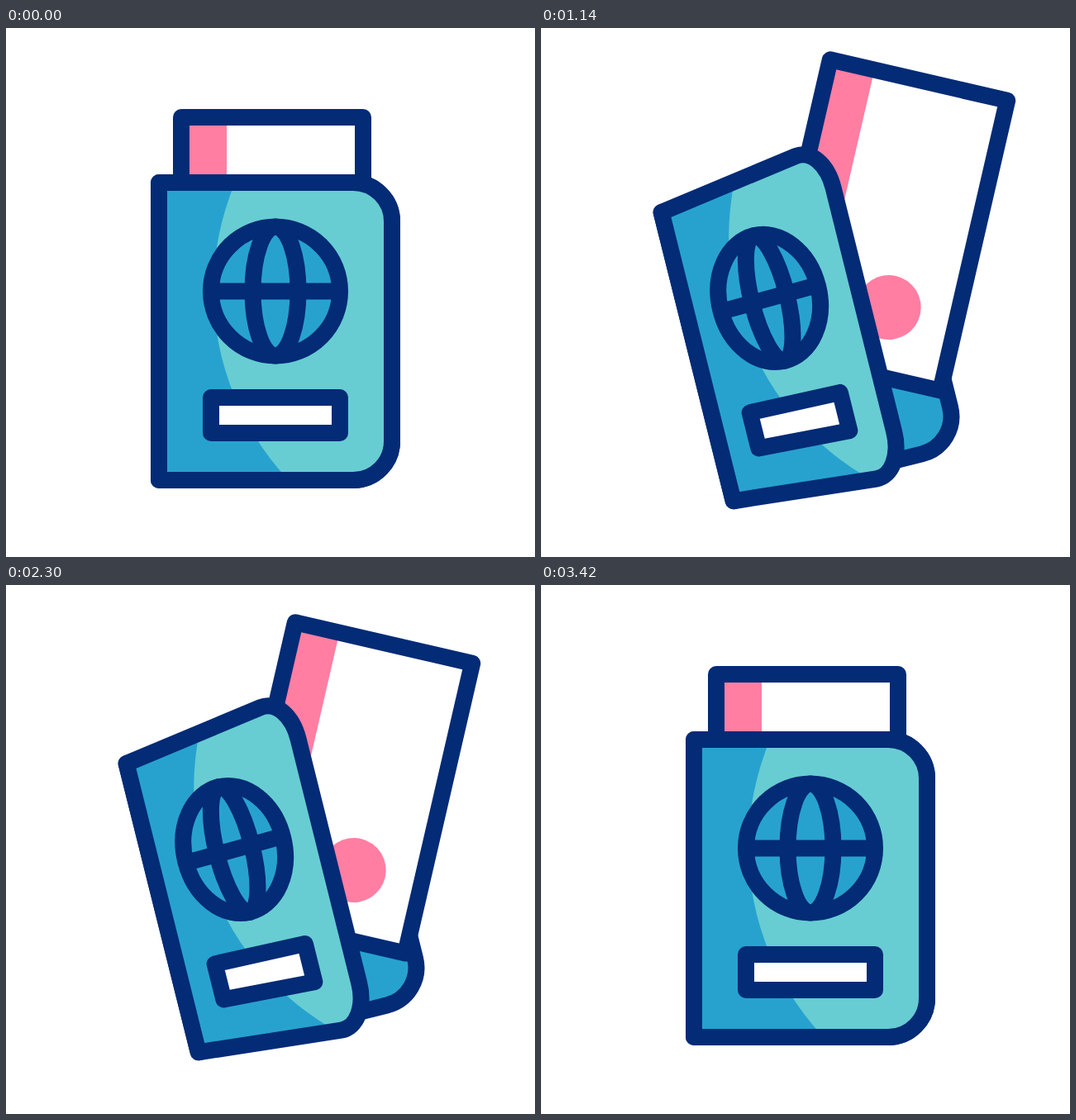
An HTML page that plays this animation: 640 by 640 pixels, repeating every 3.62 s.

```html
<!DOCTYPE html>
<html lang="en">
<head>
<meta charset="utf-8">
<title>Passport and ticket</title>
<style>
  html, body { margin: 0; width: 100%; height: 100%; overflow: hidden; background: #fff; }
  svg { display: block; width: 100vw; height: 100vh; }
  .line { stroke: #032b76; stroke-width: 20; stroke-linejoin: round; fill: none; }
  .blue { fill: #27a2cf; }
  .teal { fill: #67cdd2; }
  .pink { fill: #ff7ea2; }
  .white { fill: #fff; }
</style>
</head>
<body>
<svg viewBox="0 0 640 640">
  <defs><clipPath id="inside"><path id="clip"/></clipPath></defs>
  <g id="back"><path id="backCover" class="line blue"/></g>
  <g id="ticket">
    <rect class="white" x="212" y="108" width="220" height="360"/>
    <rect class="pink" x="212" y="108" width="55" height="360"/>
    <circle class="pink" cx="348.5" cy="384" r="39"/>
    <rect class="line" x="212" y="108" width="220" height="360"/>
  </g>
  <g id="front">
    <path id="fill" class="blue"/>
    <g clip-path="url(#inside)"><circle id="shade" class="teal" cy="317" r="337"/></g>
    <path id="cover" class="line"/>
    <g id="globe">
      <ellipse id="ring" class="line blue" ry="78"/>
      <ellipse id="meridian" class="line" ry="78"/>
      <path id="equator" class="line"/>
    </g>
    <path id="label" class="line white"/>
  </g>
</svg>
<script>
const STEP = 20, LOOP = 3620;
const LEFT = 185, TOP = 187, RIGHT = 467, BOTTOM = 547, RADIUS = 47;
const OPEN_START = 200, BOB_START = 1000, BOB_HALF = 400, CLOSE_START = 2606, MOVE = 800;

const $ = id => document.getElementById(id);
const set = (id, attrs) => {
  for (const name in attrs) $(id).setAttribute(name, attrs[name]);
};
const smooth = u => {
  u = Math.min(1, Math.max(0, u));
  return u * u * (3 - 2 * u);
};

// Narrows the cover towards its spine while its free edge grows taller.
const turn = (open, shrink) => (x, y) => {
  const across = (x - LEFT) / (RIGHT - LEFT);
  const down = (y - TOP) / (BOTTOM - TOP);
  const px = LEFT + (x - LEFT) * (1 - shrink * open);
  const py = y + open * across * (51 * down - 32);
  return px.toFixed(2) + ' ' + py.toFixed(2);
};

function coverPath(map) {
  const flat = RIGHT - RADIUS, bend = RADIUS * 0.5523;
  return `M${map(LEFT, TOP)}L${map(flat, TOP)}` +
    `C${map(flat + bend, TOP)} ${map(RIGHT, TOP + RADIUS - bend)} ${map(RIGHT, TOP + RADIUS)}` +
    `L${map(RIGHT, BOTTOM - RADIUS)}` +
    `C${map(RIGHT, BOTTOM - RADIUS + bend)} ${map(flat + bend, BOTTOM)} ${map(flat, BOTTOM)}` +
    `L${map(LEFT, BOTTOM)}Z`;
}

function labelPath(map) {
  return `M${map(248, 447)}L${map(404, 447)}L${map(404, 490)}L${map(248, 490)}Z`;
}

function bobAt(t) {
  const u = (t - BOB_START) / BOB_HALF;
  if (u <= 0 || u >= 4) return 0;
  const phase = u % 2;
  return 12.4 * smooth(phase < 1 ? phase : 2 - phase);
}

function draw(t) {
  const open = smooth((t - OPEN_START) / MOVE) - smooth((t - CLOSE_START) / MOVE);
  const bob = bobAt(t);

  const book = `translate(0 ${-bob}) rotate(${-14 * open} 326 367)`;
  set('back', { transform: book });
  set('front', { transform: book });
  set('ticket', {
    transform: `translate(${94.5 * open} ${-53 * open + bob}) rotate(${13 * open} 322 288)`
  });

  const d = coverPath(turn(open, 0.259));
  for (const id of ['clip', 'fill', 'cover']) set(id, { d });
  set('shade', { cx: 588 - 4 * open });
  set('label', { d: labelPath(turn(open, 0.283)) });

  const radius = 78 * (1 - 0.222 * open), tilt = 0.024 * open * radius;
  set('globe', { transform: `translate(${326 - 39.5 * open} ${318.5 + open})` });
  set('ring', { rx: radius });
  set('meridian', { rx: 27.5 * (1 - 0.21 * open) });
  set('equator', { d: `M${-radius} ${tilt}L${radius} ${-tilt}` });
}

set('backCover', { d: coverPath(turn(0, 0)) });

const start = performance.now();
function tick() {
  const t = (performance.now() - start) % LOOP;
  draw(Math.floor(t / STEP) * STEP);
  requestAnimationFrame(tick);
}
draw(0);
requestAnimationFrame(tick);
</script>
</body>
</html>
```
